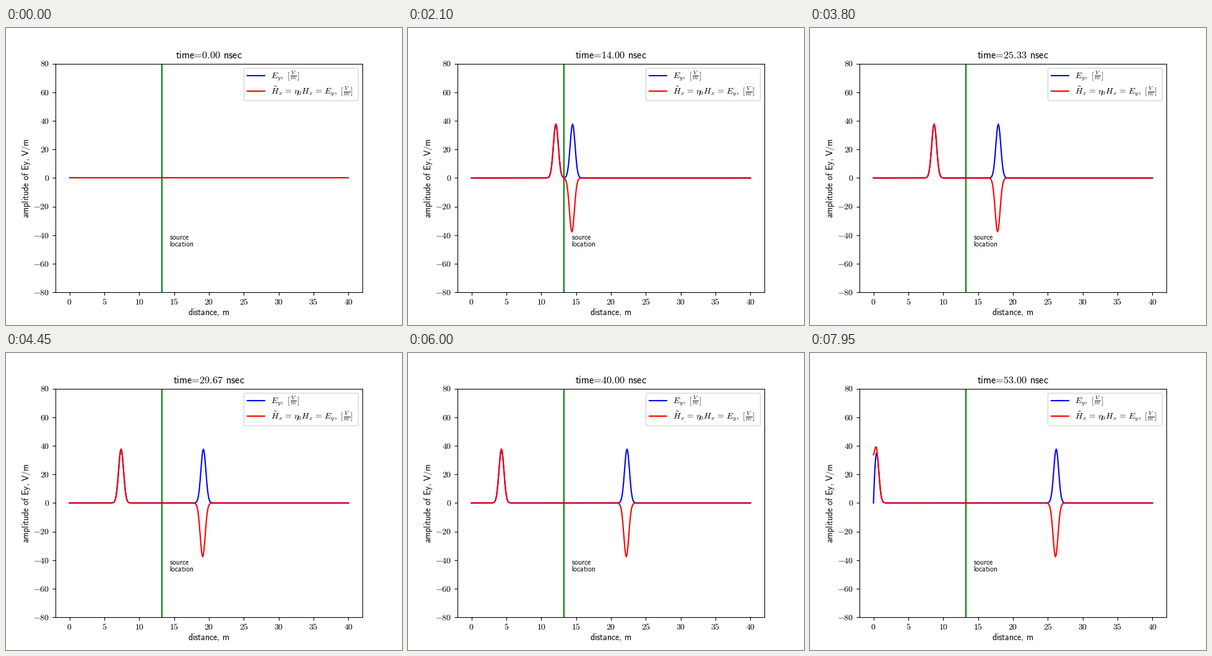
Animation, 640 px wide and 480 px high, one loop 8 s. Source, as a matplotlib script:

```python
import numpy as np
import matplotlib.pyplot as plt
from matplotlib.animation import FuncAnimation
from matplotlib.lines import Line2D
from matplotlib.patches import FancyBboxPatch

W, H, DPI = 640, 480, 100
FRAMES, INTERVAL = 160, 50

DX = 0.1          # metres per cell; one cell is crossed per step
FEED = 133        # cell where the pulses start
PEAK_STEP = 30    # step at which the feed peaks
WIDTH = 5         # pulse width in steps
AMP = 37.7

plt.rcParams["mathtext.fontset"] = "cm"

cells = np.arange(401)
dist = cells * DX


def pulse(d):
    return AMP * np.exp(-(d / WIDTH) ** 2)


def fields(step):
    """Two pulses leaving the feed, with a conducting wall at zero."""
    m = step - PEAK_STEP
    e = pulse(m - np.abs(cells - FEED)) - pulse(cells + FEED - m)
    left = pulse(cells - FEED + m)
    right = -pulse(cells - FEED - m + 1)
    h = np.where(cells < FEED, left, right) + pulse(cells + FEED - m + 1)
    return e, h


def sans(s):
    """Sans-serif mathtext with ordinary word spacing."""
    s = s.replace(", ", r",\hspace{0.18}").replace(" ", r"\hspace{0.38}")
    s = s.replace("=", r"\hspace{-0.2}=\hspace{-0.2}")
    return rf"$\mathsf{{{s}}}$"


fig = plt.figure(figsize=(W / DPI, H / DPI), dpi=DPI, facecolor="white")
ax = fig.add_axes([0.125, 0.11, 0.775, 0.77])
ax.set_xlim(-2, 42)
ax.set_ylim(-80, 80)
ax.set_xticks(range(0, 41, 5))
ax.set_yticks(range(-80, 81, 20))
ax.tick_params(labelbottom=False, labelleft=False)


def label(x, y, s, **kw):
    """Text with its baseline at pixel (x, y), measured from the top left."""
    return fig.text(x / W, 1 - y / H, s, va="baseline", **kw)


def tick_label(v, xy, coords, offset, ha):
    ax.annotate(f"${v}$", xy, xycoords=coords, xytext=offset,
                textcoords="offset pixels", ha=ha, va="baseline",
                fontsize=10)


for v in range(0, 41, 5):
    tick_label(v, (v, 0), ax.get_xaxis_transform(), (0, -19.6), "center")
for v in range(-80, 81, 20):
    tick_label(v, (0, v), ax.get_yaxis_transform(), (-9.7, -4.8), "right")

title = label(328, 49.3, "", ha="center", fontsize=11.75)
label(328, 464.3, sans("distance, m"), ha="center", fontsize=10)
label(36.7, 242.4, sans("amplitude of Ey, V/m"), ha="center", fontsize=10,
      rotation=90, rotation_mode="anchor")
label(264, 342, sans("source"), fontsize=8.5)
label(264, 353, sans("location"), fontsize=8.5)

ax.axvline(FEED * DX, color="g", lw=1.5, zorder=1.5)
e_line, = ax.plot([], [], color="b", lw=1.5, zorder=2)
h_line, = ax.plot([], [], color="r", lw=1.5, zorder=2.1)

# Legend
fig.add_artist(FancyBboxPatch(
    (384.5, H - 117.5), 185, 52.5, transform=None,
    boxstyle="round,pad=0,rounding_size=2.8",
    fc="white", ec="0.8", lw=1, alpha=0.8))
unit = r",\ [\hspace{0.1}\frac{V}{m}\hspace{0.05}]"
eq = r"\hspace{0.116}=\hspace{0.116}"
rows = [
    (77, "b", "$E_y" + unit + "$"),
    (102, "r", r"$\tilde{H}_x" + eq + r"\eta_0 H_x" + eq + "E_y" + unit + "$"),
]
for y, color, s in rows:
    fig.add_artist(Line2D([389.9 / W, 417.7 / W], [1 - y / H] * 2,
                          color=color, lw=1.5, solid_capstyle="projecting"))
    label(428, y + 4.8, s, fontsize=10)


def draw(step):
    e, h = fields(step)
    e_line.set_data(dist, e)
    h_line.set_data(dist, h)
    title.set_text(sans(f"time={step / 3:.2f} nsec"))
    return e_line, h_line, title


anim = FuncAnimation(fig, draw, frames=FRAMES, interval=INTERVAL,
                     repeat=True, repeat_delay=0, blit=False)
plt.show()
```
